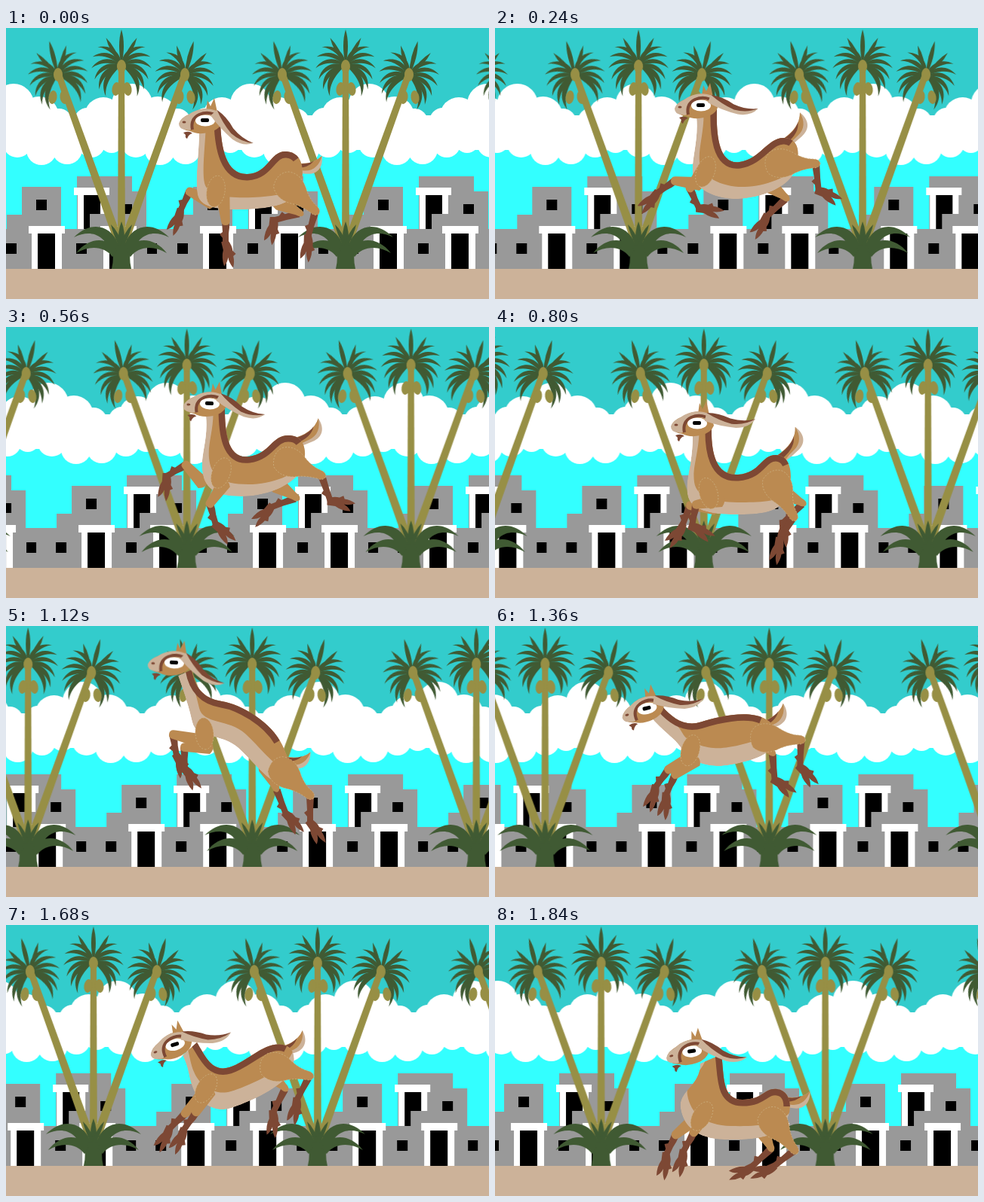
These frames come from a looping animation (640 by 360 pixels, 1920 ms). An HTML page without scripts:

```html
<!DOCTYPE html>
<html lang="en">
<head>
<meta charset="utf-8">
<title>Running goat</title>
<style>
@property --x { syntax: "<length>"; inherits: true; initial-value: 0px }
@property --y { syntax: "<length>"; inherits: true; initial-value: 0px }
@property --a { syntax: "<angle>"; inherits: true; initial-value: 0deg }
@property --b { syntax: "<angle>"; inherits: true; initial-value: 0deg }
@property --c { syntax: "<angle>"; inherits: true; initial-value: 0deg }

html, body { margin: 0; width: 100%; height: 100%; overflow: hidden; background: #3cc }
svg { display: block; width: 640px; height: 360px }

/* scrolling layers: one tile per loop */
.layer { animation: scroll 1920ms steps(24) -1ms infinite }
@keyframes scroll { to { transform: translateX(var(--tile)) } }

/* goat rig: position plus absolute joint angles */
.rig, .coat { animation: 1920ms linear -1ms infinite }
.rig { transform: translate(var(--x), var(--y)) }
.turn { transform: rotate(var(--a)) }
.low { transform: rotate(var(--b)) }
.foot { transform: translate(var(--len)) rotate(calc(var(--c) - var(--b))) }
.ear { transform: translate(14px, -8px) rotate(var(--b)) }
.rear { --len: 37px }
.fore { --len: 30px }
.coat { animation-name: coat }

.fur { fill: #bb8a51 }
.dark { fill: #7d4834 }
.pale { fill: #ccb299 }
.leaf { fill: #405a33 }
.nut { fill: #978f45 }
.seam { stroke: #ccb080; stroke-width: .8; stroke-dasharray: 2 2 }

@keyframes coat {
  0%, 100% { animation-timing-function: steps(3); d: path("M284 125C285 160 292 195 320 194S350 162 372 164S396 190 390 212S350 240 318 241S258 240 254 222S256 165 256 137Z") }
  12.5% { animation-timing-function: steps(4); d: path("M294 108C293 140 296 182 324 178S362 144 384 146S404 172 396 192S352 226 322 227S264 214 262 194S270 150 267 118Z") }
  29.166% { animation-timing-function: steps(3); d: path("M290 108C290 140 294 176 322 172S352 144 374 144S400 165 393 186S350 225 312 225S262 212 260 190S268 150 265 118Z") }
  41.666% { animation-timing-function: steps(4); d: path("M287 132C286 165 292 198 322 196S352 170 372 170S396 196 388 222S350 249 318 249S258 244 255 222S262 185 262 143Z") }
  58.333% { animation-timing-function: steps(5); d: path("M246 58C250 80 260 96 286 100S352 128 366 158S378 196 366 206S330 182 308 162S252 150 247 128S238 95 228 66Z") }
  79.166% { animation-timing-function: steps(4); d: path("M206 140C225 150 246 160 264 146S322 100 350 99S378 122 362 138S298 188 290 202S260 202 250 191S216 174 196 162Z") }
  95.833% { animation-timing-function: steps(1); d: path("M300 172C304 200 300 232 328 232S356 216 374 218S396 245 384 264S340 286 304 285S250 268 246 244S272 215 272 184Z") }
}
@keyframes flank {
  0%, 41.666%, 100% { animation-timing-function: steps(4); --x: 9px; --y: -16px }
  58.333% { animation-timing-function: steps(5); --x: 9px; --y: -19px }
  79.166% { animation-timing-function: steps(4); --x: -7px; --y: -27px }
  95.833% { animation-timing-function: steps(1); --x: 9px; --y: -18px }
}
@keyframes head {
  0%, 100% { animation-timing-function: steps(3); --x: 264px; --y: 122px; --a: 0deg; --b: 38deg }
  12.5% { animation-timing-function: steps(4); --x: 273px; --y: 102px; --a: 0deg; --b: 12deg }
  29.166% { animation-timing-function: steps(3); --x: 270px; --y: 101px; --a: 2deg; --b: 19deg }
  41.666% { animation-timing-function: steps(4); --x: 268px; --y: 127px; --a: 0deg; --b: 3deg }
  58.333% { animation-timing-function: steps(5); --x: 223px; --y: 48px; --a: 3deg; --b: 31deg }
  79.166% { animation-timing-function: steps(4); --x: 187px; --y: 149px; --a: -25deg; --b: 1deg }
  95.833% { animation-timing-function: steps(1); --x: 261px; --y: 167px; --a: -8deg; --b: 25deg }
}
@keyframes tail {
  0%, 100% { animation-timing-function: steps(3); --x: 380px; --y: 180px; --a: -15deg }
  12.5% { animation-timing-function: steps(4); --x: 384px; --y: 147px; --a: -60deg }
  29.166% { animation-timing-function: steps(3); --x: 384px; --y: 148px; --a: -42deg }
  41.666% { animation-timing-function: steps(4); --x: 379px; --y: 168px; --a: -62deg }
  58.333% { animation-timing-function: steps(5); --x: 364px; --y: 173px; --a: -8deg }
  79.166% { animation-timing-function: steps(4); --x: 343px; --y: 99px; --a: -62deg }
  95.833% { animation-timing-function: steps(1); --x: 378px; --y: 228px; --a: -10deg }
}
@keyframes shoulder {
  0%, 100% { animation-timing-function: steps(3); --x: 278px; --y: 217px; --a: 100deg }
  12.5% { animation-timing-function: steps(4); --x: 279px; --y: 191px; --a: 110deg }
  29.166% { animation-timing-function: steps(3); --x: 285px; --y: 194px; --a: 110deg }
  41.666% { animation-timing-function: steps(4); --x: 283px; --y: 221px; --a: 75deg }
  58.333% { animation-timing-function: steps(5); --x: 263px; --y: 143px; --a: 85deg }
  79.166% { animation-timing-function: steps(4); --x: 256px; --y: 180px; --a: 120deg }
  95.833% { animation-timing-function: steps(1); --x: 274px; --y: 254px; --a: 120deg }
}
@keyframes rear-near {
  0%, 100% { animation-timing-function: steps(3); --x: 410px; --y: 243px; --a: 222deg; --b: 106deg; --c: 92deg }
  12.5% { animation-timing-function: steps(4); --x: 425px; --y: 180px; --a: 180deg; --b: 84deg; --c: 22deg }
  29.166% { animation-timing-function: steps(3); --x: 418px; --y: 197px; --a: 202deg; --b: 71deg; --c: 8deg }
  41.666% { animation-timing-function: steps(4); --x: 396px; --y: 252px; --a: 242deg; --b: 122deg; --c: 99deg }
  58.333% { animation-timing-function: steps(5); --x: 403px; --y: 225px; --a: 221deg; --b: 90deg; --c: 55deg }
  79.166% { animation-timing-function: steps(4); --x: 407px; --y: 102px; --a: 157deg; --b: 93deg; --c: 39deg }
  95.833% { animation-timing-function: steps(1); --x: 397px; --y: 299px; --a: 232deg; --b: 142deg; --c: 157deg }
}
@keyframes rear-far {
  0%, 100% { animation-timing-function: steps(3); --x: 390px; --y: 246px; --a: 210deg; --b: 165deg; --c: 97deg }
  12.5% { animation-timing-function: steps(4); --x: 386px; --y: 226px; --a: 219deg; --b: 137deg; --c: 119deg }
  29.166% { animation-timing-function: steps(3); --x: 385px; --y: 227px; --a: 215deg; --b: 160deg; --c: 131deg }
  41.666% { animation-timing-function: steps(4); --x: 408px; --y: 234px; --a: 209deg; --b: 135deg; --c: 87deg }
  58.333% { animation-timing-function: steps(5); --x: 358px; --y: 216px; --a: 247deg; --b: 69deg; --c: 48deg }
  79.166% { animation-timing-function: steps(4); --x: 374px; --y: 137px; --a: 203deg; --b: 96deg; --c: 22deg }
  95.833% { animation-timing-function: steps(1); --x: 366px; --y: 297px; --a: 245deg; --b: 137deg; --c: 154deg }
}
@keyframes fore-far {
  0%, 100% { animation-timing-function: steps(3); --x: 243px; --y: 217px; --a: 27deg; --b: 115deg; --c: 109deg }
  12.5% { animation-timing-function: steps(4); --x: 238px; --y: 203px; --a: 7deg; --b: 145deg; --c: 129deg }
  29.166% { animation-timing-function: steps(3); --x: 238px; --y: 183px; --a: 47deg; --b: 149deg; --c: 94deg }
  41.666% { animation-timing-function: steps(4); --x: 258px; --y: 237px; --a: 6deg; --b: 110deg; --c: 123deg }
  58.333% { animation-timing-function: steps(5); --x: 221px; --y: 144px; --a: 13deg; --b: 80deg; --c: 63deg }
  79.166% { animation-timing-function: steps(4); --x: 235px; --y: 222px; --a: -54deg; --b: 156deg; --c: 133deg }
  95.833% { animation-timing-function: steps(1); --x: 239px; --y: 279px; --a: -39deg; --b: 115deg; --c: 97deg }
}
@keyframes fore-near {
  0%, 100% { animation-timing-function: steps(3); --x: 291px; --y: 257px; --a: -96deg; --b: 90deg; --c: 76deg }
  12.5% { animation-timing-function: steps(4); --x: 258px; --y: 213px; --a: -54deg; --b: 65deg; --c: 8deg }
  29.166% { animation-timing-function: steps(3); --x: 270px; --y: 235px; --a: -55deg; --b: 74deg; --c: 41deg }
  41.666% { animation-timing-function: steps(4); --x: 266px; --y: 236px; --a: -10deg; --b: 100deg; --c: 25deg }
  58.333% { animation-timing-function: steps(5); --x: 236px; --y: 161px; --a: 0deg; --b: 88deg; --c: 52deg }
  79.166% { animation-timing-function: steps(4); --x: 240px; --y: 222px; --a: -58deg; --b: 131deg; --c: 123deg }
  95.833% { animation-timing-function: steps(1); --x: 263px; --y: 276px; --a: -57deg; --b: 118deg; --c: 101deg }
}
</style>
</head>
<body>
<svg viewBox="0 0 640 360">
<defs>
  <g id="cloud" fill="#fff">
    <path d="M-2 116H158V162H-2Z"/>
    <circle cx="10" cy="101" r="27"/><circle cx="44" cy="117" r="26"/>
    <circle cx="70" cy="125" r="18"/><circle cx="108" cy="124" r="18"/>
    <circle cx="129" cy="117" r="25"/>
    <circle cx="15" cy="153" r="19"/><circle cx="47" cy="162" r="20"/>
    <circle cx="81" cy="161" r="20"/><circle cx="113" cy="154" r="18"/>
    <circle cx="140" cy="150" r="16"/>
  </g>

  <g id="house" shape-rendering="crispEdges">
    <path fill="#999" d="M1 248H21V211H73V268H1ZM94 197H167V217H186V268H94Z"/>
    <path fill="#fff" d="M90 212h47v10h-4v45H95v-45h-5z"/>
    <path d="M103 222h22v46h-22zM40 228h14v14h-14z"/>
    <path fill="#999" d="M111 247H186V268H111ZM0 267H227V321H0Z"/>
    <path d="M153 234h14v13h-14z"/>
    <path fill="#fff" d="M30 263h48v10h-4v48h-40v-48h-4zM125 263h48v10h-4v48h-40v-48h-4z"/>
    <path d="M42 273h23v48h-23zM137 273h23v48h-23zM0 286h14v14h-14zM93 286h14v14h-14zM187 286h13v14h-13z"/>
  </g>

  <path id="frond" d="M0 0C10 -13 28 -15 40 0C27 -8 12 -5 0 0"/>
  <path id="spike" d="M0 0Q-6 -28 0 -48Q6 -28 0 0"/>
  <g id="side">
    <use href="#spike" transform="rotate(29) scale(.88)"/>
    <use href="#frond" transform="rotate(-38)"/>
    <use href="#frond" transform="rotate(-17)"/>
    <use href="#frond" transform="rotate(5)"/>
    <use href="#frond" transform="rotate(27)"/>
    <use href="#frond" transform="rotate(47) scale(1.08)"/>
    <use href="#frond" transform="rotate(63) scale(1.14)"/>
  </g>
  <g id="crown" class="leaf">
    <use href="#spike"/><use href="#side"/><use href="#side" transform="scale(-1 1)"/>
  </g>
  <g id="nuts" class="nut">
    <ellipse cx="-7" cy="31" rx="5.5" ry="9" transform="rotate(8 -7 31)"/>
    <ellipse cx="8" cy="31" rx="5.5" ry="9" transform="rotate(-8 8 31)"/>
    <ellipse cy="1" rx="6" ry="9"/>
  </g>
  <path id="blades" d="M-4 288C-14 260 -42 256 -63 278C-42 268 -24 272 -13 300ZM-6 296C-18 276 -44 278 -60 299C-42 288 -22 290 -12 304ZM-3 290Q-12 272 -14 261Q-4 270 2 290Z"/>
  <path id="trunk" class="nut" d="M-87 64L-79 61L7 297L-4 300Z"/>
  <g id="palm">
    <use href="#crown" transform="translate(-84 64) rotate(-14)"/>
    <use href="#crown" transform="translate(84 64) rotate(14)"/>
    <use href="#crown" y="50"/>
    <use href="#trunk"/><use href="#trunk" transform="scale(-1 1)"/>
    <path class="nut" d="M-4 46H4L5 300H-5Z"/>
    <use href="#nuts" x="-84" y="61"/><use href="#nuts" x="84" y="61"/><use href="#nuts" y="50"/>
    <g class="leaf">
      <path d="M0 257Q5 270 4 286L14 290Q9 304 13 320H-13Q-9 304 -14 290L-4 286Q-5 270 0 257Z"/>
      <use href="#blades"/><use href="#blades" transform="scale(-1 1)"/>
    </g>
  </g>

  <path id="hoof" class="dark" d="M-5 -4Q4 -8 11 -7L16 -10L18 -6Q26 -6 33 -2Q24 2 18 1Q25 4 28 9Q16 10 7 5L-4 5Z"/>
  <path id="forearm" class="fur" d="M-5 0Q-5 -6 2 -6L34 -9Q43 0 34 9L2 6Q-5 6 -5 0Z"/>
  <path id="shin" class="dark" d="M-2 -5H8L16 -4H30V4L22 4L17 8L14 4L0 5Z"/>
  <path id="hock" class="dark" d="M2 -5L20 -4H37V4L28 4L23 8L20 4L2 5Z"/>

  <clipPath id="skin"><path class="coat"/></clipPath>
</defs>

<path fill="#3ff" d="M0 135H640V330H0Z"/>
<g class="layer" style="--tile:157px">
  <use href="#cloud" x="-157"/><use href="#cloud"/><use href="#cloud" x="157"/>
  <use href="#cloud" x="314"/><use href="#cloud" x="471"/><use href="#cloud" x="628"/>
</g>
<g class="layer" style="--tile:226.5px">
  <use href="#house" x="-226.5"/><use href="#house"/><use href="#house" x="226.5"/><use href="#house" x="453"/>
</g>
<path class="pale" d="M0 320H640V360H0Z"/>
<g class="layer" style="--tile:297px">
  <use href="#palm" x="-144"/><use href="#palm" x="153"/><use href="#palm" x="450"/><use href="#palm" x="747"/>
</g>

<g id="goat">
  <g class="rig" style="animation-name:tail"><g class="turn">
    <path class="pale" d="M-6 -4Q22 11 40 0C38 15 28 23 14 18Q4 15 -6 10Z"/>
    <path class="fur" d="M-6 -4Q22 11 40 0C34 11 24 17 12 13Q4 10 -6 9Z"/>
    <path class="dark" d="M-8 -5Q14 8 28 4Q16 13 -4 5Z"/>
  </g></g>

  <g class="rig rear" style="animation-name:rear-far">
    <g class="low"><use href="#hock"/><g class="foot"><use href="#hoof"/></g></g>
    <path class="turn fur" d="M-5 0Q-4 -5 4 -5L30 -12Q48 -8 46 4Q40 14 28 10L4 5Q-4 5 -5 0Z"/>
  </g>
  <g class="rig fore" style="animation-name:fore-far">
    <g class="low"><use href="#shin"/><g class="foot"><use href="#hoof"/></g></g>
    <g class="turn"><use href="#forearm"/></g>
  </g>

  <g clip-path="url(#skin)">
    <path class="coat pale"/>
    <g class="rig" style="animation-name:flank"><path class="coat fur"/></g>
    <path class="coat" fill="none" stroke="#7d4834" stroke-width="17" pathLength="100" stroke-dasharray="35 100"/>
  </g>

  <g class="rig rear" style="animation-name:rear-near">
    <g class="low"><use href="#hock"/><g class="foot"><use href="#hoof"/></g></g>
    <path class="turn fur seam" d="M-6 0Q-5 -6 4 -6Q20 -8 32 -15Q50 -23 63 -13Q72 4 61 15Q46 25 26 12Q14 6 4 6Q-5 6 -6 0Z"/>
  </g>
  <g class="rig fore" style="animation-name:fore-near">
    <g class="low"><use href="#shin"/><g class="foot"><use href="#hoof"/></g></g>
    <g class="turn"><use href="#forearm"/></g>
  </g>
  <g class="rig" style="animation-name:shoulder">
    <ellipse class="turn fur seam" rx="21" ry="12"/>
  </g>

  <g class="rig" style="animation-name:head"><g class="turn">
    <path class="fur" d="M1 -12L3 -26L7 -18L12 -29L16 -10Z"/>
    <path class="fur" d="M-34 4Q-32 -3 -20 -8Q-8 -16 8 -15Q20 -10 22 4Q18 14 4 17Q-10 20 -20 15Q-32 14 -34 4Z"/>
    <path class="pale" d="M-35 5Q-33 -2 -22 -7Q-8 -17 8 -14Q18 -12 22 -6L18 0Q8 -9 -6 -7Q-16 -4 -17 8Q-18 16 -26 13Q-35 12 -35 5Z"/>
    <path fill="none" stroke="#7d4834" stroke-width="4" d="M-17 13Q-20 -1 -8 -7Q6 -13 19 -3"/>
    <path class="dark" d="M-29 17Q-21 14 -17 18Q-22 19 -24 25Q-27 24 -26 20Z"/>
    <ellipse class="dark" cx="-28" cy="3" rx="2.5" ry="1.5"/>
    <ellipse fill="#fff" cy="1" rx="13" ry="7.5"/>
    <rect x="-6" y="-2" width="11" height="5" rx="2"/>
    <g class="ear">
      <path class="pale" d="M-2 -5Q14 -2 30 4Q48 6 63 0Q56 12 38 13Q16 12 -4 6Z"/>
      <path class="dark" d="M-2 -5Q14 -6 30 1Q48 5 63 0Q50 9 32 8Q14 4 -2 -5Z"/>
    </g>
  </g></g>
</g>
</svg>
</body>
</html>
```
